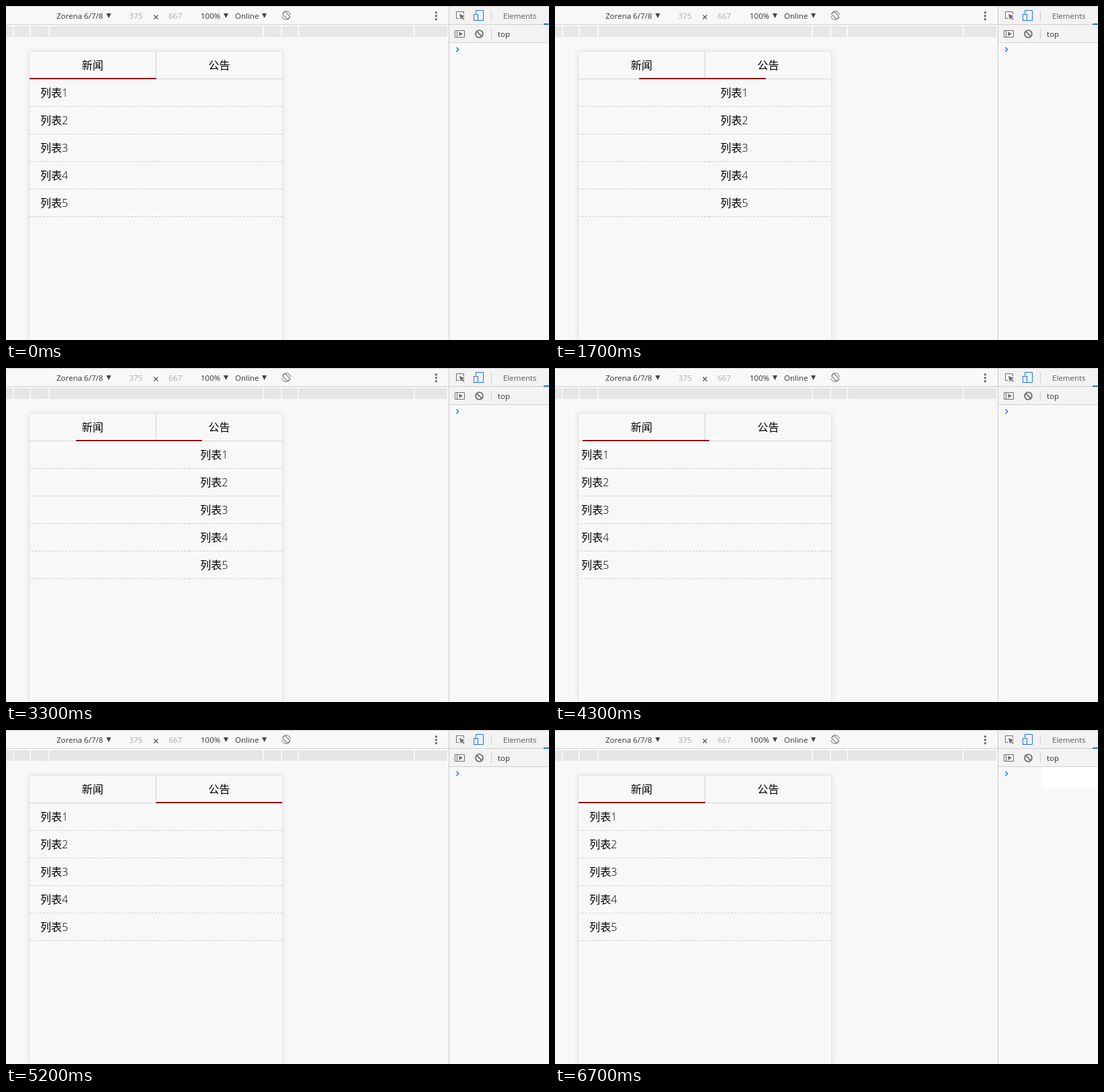
Animation of 806x497 px, one loop 7.1 s. Source, as an HTML page:

```html
<!DOCTYPE html>
<html lang="zh-CN">
<head>
<meta charset="utf-8">
<title>Swipe tabs</title>
<style>
  @property --p { syntax: "<number>"; inherits: true; initial-value: 0; }

  html, body { margin: 0; width: 100%; height: 100%; overflow: hidden; background: #f8f8f8; }
  .stage { position: relative; width: 806px; height: 497px; overflow: hidden; contain: paint; }
  svg { position: absolute; left: 0; top: 0; }
  svg text { font: 11.5px "Open Sans", "Noto Sans", sans-serif; fill: #333; }
  svg .dim { fill: #aaa; }
  svg .tab { fill: #5a5a5a; }

  .phone {
    position: absolute; left: 34px; top: 67px; width: 375px; height: 429px;
    border: 1px solid #e3e3e3; border-bottom: 0; border-radius: 2px 2px 0 0;
    box-shadow: 0 0 10px rgba(0, 0, 0, .08);
    font: 350 16px/40px "Open Sans", "Noto Sans CJK SC", "Noto Sans CJK", sans-serif; color: #000;
    overflow: hidden;
    --at: clamp(0, var(--p), 1);
    animation: swipe 7100ms infinite;
  }
  .tabs { display: flex; height: 40px; border-bottom: 1px solid #d3d3d3; }
  .tabs div { flex: 1; text-align: center; box-sizing: border-box; }
  .tabs div:first-child { border-right: 1px solid #d3d3d3; }
  /* Offsets rather than transforms, so edges and text snap to whole pixels. */
  .bar {
    position: absolute; left: calc(var(--at) * 187.5px); top: 39px;
    width: 187.5px; height: 2px; background: #8b0000;
  }
  .lists { position: absolute; display: flex; width: 750px; left: calc(var(--at) * -375px); }
  ul { width: 375px; margin: 0; padding: 0; list-style: none; }
  li { height: 40px; padding-left: 16px; border-bottom: 1px dashed #ccc; }

  .toast {
    position: absolute; left: 722px; top: 55px; width: 84px; height: 31px;
    background: #fff; border-bottom-left-radius: 4px;
    animation: toast 7100ms step-end infinite;
  }

  /* Linear one-second slides sampled ten times a second; overshoot is clamped. */
  @keyframes swipe {
    0%      { --p: 0;     animation-timing-function: step-end; }
    18.309% { --p: .067;  animation-timing-function: steps(9); }
    30.985% { --p: 1;     animation-timing-function: step-end; }
    39.436% { --p: .905;  animation-timing-function: steps(9); }
    52.112% { --p: -.063; animation-timing-function: step-end; }
    60.563% { --p: .032;  animation-timing-function: steps(9); }
    73.239% { --p: 1;     animation-timing-function: step-end; }
    78.873% { --p: .94;   animation-timing-function: steps(9); }
    91.549% { --p: -.03;  animation-timing-function: step-end; }
    100%    { --p: 0; }
  }
  @keyframes toast {
    0%      { opacity: 0; }
    92.957% { opacity: .5; }
    94.366% { opacity: 1; }
    100%    { opacity: 1; }
  }
</style>
</head>
<body>
<div class="stage">
  <svg width="806" height="497" viewBox="0 0 806 497">
    <!-- panels -->
    <path fill="#f3f3f3" d="M658 0h148v54h-148z"/>
    <path fill="#d0d0d0" d="M0 0h806v1H0zM0 27h806v1H0zM658 54h148v1H658z"/>
    <path fill="#ccc" d="M657 0h1v497h-1zM720 7h1v15h-1zM720 34h1v15h-1z"/>
    <path fill="#1a73e8" d="M798 26h8v2h-8z"/>
    <path fill="#e6e6e6" d="M0 30h10v16H0zM12 30h23v16H12zM37 30h26v16H37zM65 30h316v16H65zM383 30h25v16h-25zM410 30h23v16h-23zM435 30h170v16H435zM607 30h48v16h-48z"/>

    <!-- device toolbar -->
    <text x="75" y="19">Zorena 6/7/8</text>
    <text x="183" y="19" class="dim">375</text>
    <text x="241.5" y="19" class="dim">667</text>
    <text x="289" y="19">100%</text>
    <text x="340" y="19">Online</text>
    <path fill="#444" d="M149 11h7l-3.500 7zM323 11h7l-3.500 7zM380 11h7l-3.500 7z"/>
    <path fill="none" stroke="#555" stroke-width="1.2" d="M219.500 13.500l6 6M225.500 13.500l-6 6"/>
    <g fill="none" stroke="#6e6e6e">
      <circle cx="416" cy="14" r="6.300" stroke-dasharray="15 4.800" stroke-dashoffset="-3"/>
      <rect x="413.300" y="8.500" width="5.400" height="11" rx="1" transform="rotate(-45 416 14)"/>
    </g>
    <g fill="#6e6e6e">
      <circle cx="638.500" cy="9.700" r="1.700"/>
      <circle cx="638.500" cy="14.700" r="1.700"/>
      <circle cx="638.500" cy="19.700" r="1.700"/>
    </g>

    <!-- inspector toolbar -->
    <path fill="none" stroke="#6e6e6e" d="M672.500 18.500h-4v-10h11v4"/>
    <path fill="#6e6e6e" d="M673 12l8 3-3.200 1.500 3 3-1.300 1.300-3-3-1.300 3z"/>
    <g fill="none" stroke="#1a73e8">
      <path d="M697.500 11.500v-5h11v15h-8"/>
      <rect x="694.500" y="12.500" width="6" height="9"/>
    </g>
    <text x="738" y="19" class="tab">Elements</text>
    <g fill="none" stroke="#6e6e6e">
      <path d="M666.500 36.500h14v10h-14zM669.500 36.500v10"/>
      <g stroke-width="1.900">
        <circle cx="702.500" cy="41.500" r="5.400"/>
        <path d="M698.700 37.700l7.600 7.600"/>
      </g>
    </g>
    <path fill="#6e6e6e" d="M672.500 38.300l5.500 3.200-5.500 3.200z"/>
    <text x="730" y="46">top</text>
    <path fill="none" stroke="#367cf1" stroke-width="1.500" d="M668.500 61.500l3.300 3.300-3.300 3.300"/>
  </svg>

  <div class="phone">
    <div class="tabs"><div>新闻</div><div>公告</div></div>
    <div class="lists">
      <ul><li>列表1</li><li>列表2</li><li>列表3</li><li>列表4</li><li>列表5</li></ul>
      <ul><li>列表1</li><li>列表2</li><li>列表3</li><li>列表4</li><li>列表5</li></ul>
    </div>
    <div class="bar"></div>
  </div>
  <div class="toast"></div>
</div>
</body>
</html>
```
